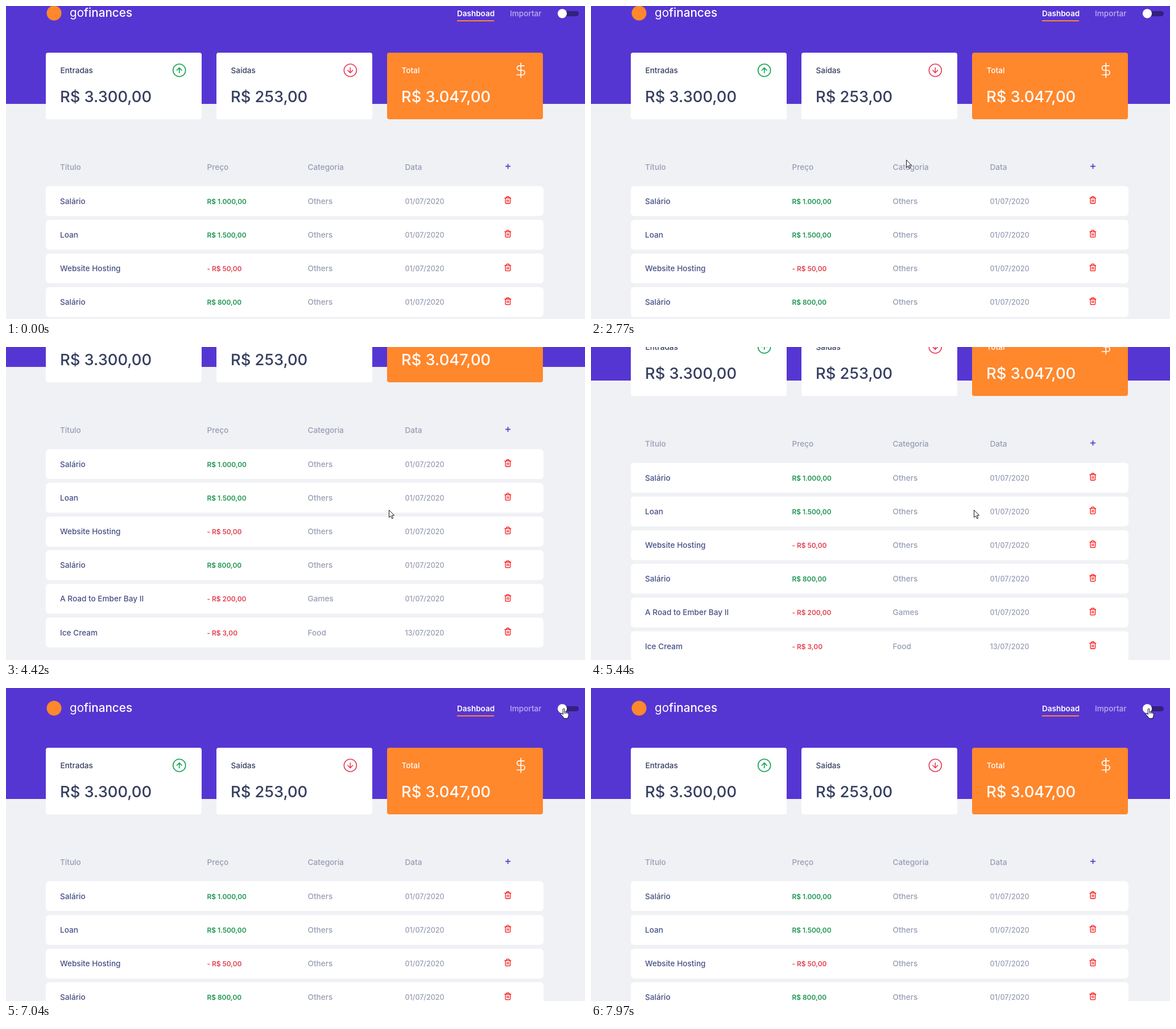
Write an HTML page that moves like this. It is 1018 px wide and 550 px high and loops after 8000 ms.

```html
<!DOCTYPE html>
<html lang="pt">
<head>
<meta charset="utf-8">
<title>gofinances</title>
<style>
html, body { margin: 0; width: 100%; height: 100%; overflow: hidden; }
svg {
  display: block; width: 1018px; height: 550px; background: var(--bg);
  font: 500 13.6px Inter, "Open Sans", sans-serif;
  --bg: #f0f1f5; --head: #5636d3; --card: #fff; --row: #fff; --total: #ff872c;
  --ink: #363f5f; --amount: #363f5f; --name: #465084; --muted: #969cb3;
  --green: #1b9450; --red: #e0404f; --plus: #5636d3; --rail: #32217c;
}
svg.dark {
  --bg: #1e1b2e; --head: #32217c; --card: #1a0f3d; --row: #19103a; --total: #c96c21;
  --ink: #d5d3e2; --amount: #c5c3d4; --name: #5856a0; --muted: #9fa1c6;
  --green: #12a454; --red: #e83f4f; --plus: #4a2fc4; --rail: #7b60dc;
}
.icon { fill: none; stroke-width: 1.5; stroke-linecap: round; stroke-linejoin: round; }
.amount { font-size: 27.3px; }
.price { font-size: 11.9px; font-weight: 600; }
.date { font-size: 12.5px; }
.brand { font-size: 20.7px; }
.active { font-size: 13.5px; font-weight: 600; }
</style>
</head>
<body>
<svg id="stage" viewBox="0 0 1018 550">
  <defs>
    <linearGradient id="sky" gradientUnits="userSpaceOnUse" x1="451" y1="315" x2="567" y2="-120">
      <stop offset=".56" style="stop-color:var(--head)"/>
      <stop offset=".94" stop-color="#5636d3"/>
    </linearGradient>
  </defs>
  <g id="page"></g>
  <circle id="click" cx="674" cy="285" r="9.7" fill="#f6f27c"/>
  <g id="cursor" fill="#fff" stroke="#15151c" stroke-linejoin="round">
    <path id="arrow" d="M.5 .5V13.6L3.5 10.8 5.7 15.6 7.7 14.7 5.5 9.9H9.6Z"/>
    <path id="hand" d="M.2 1Q1.6-1 3 1V6Q5 5 5.6 6.7 7.6 6 8.1 7.5 10 7 10.2 9V12Q10 14.5 8.8 15.8V17.5H1.8V16Q-1 13.5-3.4 10.3-3.8 8-1.8 8.6L.2 10.5Z M3 6V9 M5.6 6.7V9.3 M8.1 7.5V9.6"/>
  </g>
</svg>
<script>
const $ = id => document.getElementById(id);
const text = (x, y, str, color, cls = '', extra = '') =>
  `<text x="${x}" y="${y}" class="${cls}" style="fill:${color}" ${extra}>${str}</text>`;
const box = (x, y, w, h, r, color) =>
  `<rect x="${x}" y="${y}" width="${w}" height="${h}" rx="${r}" style="fill:${color}"/>`;
// Line icons are drawn on a 24 unit grid and centred at x, y.
const icon = (x, y, scale, color, d, width = 1.5) =>
  `<path class="icon" transform="translate(${x} ${y}) scale(${scale}) translate(-12 -12)" style="stroke:${color};stroke-width:${width}" d="${d}"/>`;

const RING = 'M22 12a10 10 0 1 1-20 0a10 10 0 1 1 20 0';
const UP = RING + 'M16 12L12 8L8 12M12 16V8';
const DOWN = RING + 'M8 12L12 16L16 12M12 8V16';
const DOLLAR = 'M12 1V23M17 5H9.5a3.5 3.5 0 0 0 0 7h5a3.5 3.5 0 0 1 0 7H6';
const TRASH = 'M3 6H21M19 6V20a2 2 0 0 1-2 2H7a2 2 0 0 1-2-2V6M8 6V4a2 2 0 0 1 2-2h4a2 2 0 0 1 2 2V6M10 11V17M14 11V17';

const card = (x, label, amount, fill, ink, big, glyph) =>
  box(x, 105, 274, 117, 4, fill) +
  text(x + 25.5, 141, label, ink) + text(x + 25, 192, amount, big, 'amount') + glyph;

const rows = [
  ['Salário', 'R$ 1.000,00', 'Others', '01'],
  ['Loan', 'R$ 1.500,00', 'Others', '01'],
  ['Website Hosting', '- R$ 50,00', 'Others', '01'],
  ['Salário', 'R$ 800,00', 'Others', '01'],
  ['A Road to Ember Bay II', '- R$ 200,00', 'Games', '01'],
  ['Ice Cream', '- R$ 3,00', 'Food', '13']
];
const row = ([name, price, category, day], i) => {
  const y = 339.5 + 59.2 * i, base = y + 31;
  return box(70, y, 875, 52.5, 6, 'var(--row)') +
    text(95, base, name, 'var(--name)') +
    text(353.5, base, price, price[0] === '-' ? 'var(--red)' : 'var(--green)', 'price') +
    text(530.5, base, category, 'var(--muted)') +
    text(701.5, base, day + '/07/2020', 'var(--muted)', 'date') +
    icon(882.3, y + 24.5, .6, '#f80c0c', TRASH, 2.1);
};

$('page').innerHTML =
  box(0, 0, 1018, 195, 0, 'url(#sky)') +
  '<circle cx="84.5" cy="35.5" r="13" fill="#ff872c"/>' +
  text(112, 41.5, '<tspan font-weight="400">go</tspan>finances', '#fff', 'brand') +
  text(793, 41, 'Dashboad', '#fff', 'active') + box(793, 48, 65, 2, 0, '#ff872c') +
  text(886, 41, 'Importar', '#fff', '', 'opacity=".6"') +
  box(974, 32, 33, 9, 4.5, 'var(--rail)') +
  '<circle id="knob" cy="36.3" r="8.1" fill="#fff"/>' +
  card(70, 'Entradas', 'R$ 3.300,00', 'var(--card)', 'var(--ink)', 'var(--amount)',
    icon(304.7, 136, 1.1, '#12a454', UP)) +
  card(370, 'Saídas', 'R$ 253,00', 'var(--card)', 'var(--ink)', 'var(--amount)',
    icon(605.3, 136, 1.1, '#e83f5b', DOWN)) +
  card(670, 'Total', 'R$ 3.047,00', 'var(--total)', '#fff', '#fff',
    icon(905.3, 136, 1.14, '#fff', DOLLAR)) +
  [[95, 'Título'], [353.5, 'Preço'], [530.5, 'Categoria'], [701.5, 'Data']]
    .map(([x, label]) => text(x, 310.5, label, 'var(--muted)')).join('') +
  '<path d="M878 304.7H887M882.5 300.2V309.2" style="stroke:var(--plus)" stroke-width="1.7"/>' +
  rows.map(row).join('');

const scrollKeys = [[0, 23], [4110, 23], [4420, 160], [5350, 160], [5720, 0], [8000, 0]];
const knobKeys = [[0, 978], [7040, 978], [7300, 1002], [7720, 1002], [7960, 978], [8000, 978]];
const cursorKeys = [
  [290, 1018, 150], [700, 700, 330], [1060, 420, 390], [1380, 326, 277], [1530, 326, 277],
  [2070, 554, 270], [2770, 554, 270], [3550, 656, 291], [3630, 674.5, 285], [3870, 674.5, 285],
  [3940, 673, 286], [5650, 673, 286], [5880, 810, 290], [6110, 892, 184], [6600, 950, 26],
  [6950, 979, 36], [8000, 979, 36]
];
const smooth = k => k * k * (3 - 2 * k);
function track(keys, t, ease = k => k) {
  const i = keys.findIndex(key => key[0] > t);
  if (i < 1) return keys[0].slice(1);
  const a = keys[i - 1], b = keys[i], k = ease((t - a[0]) / (b[0] - a[0]));
  return a.slice(1).map((v, n) => v + (b[n + 1] - v) * k);
}
const show = (id, on) => $(id).setAttribute('visibility', on ? 'visible' : 'hidden');

function draw(now) {
  const t = now % 8000;
  const [scroll] = track(scrollKeys, t, smooth);
  const [x, y] = track(cursorKeys, t);
  const overSwitch = t > 6000 && x > 969;
  $('page').setAttribute('transform', `translate(0 ${-Math.round(scroll)})`);
  $('knob').setAttribute('cx', track(knobKeys, t, smooth)[0]);
  $('cursor').setAttribute('transform', `translate(${Math.round(x)} ${Math.round(y)})`);
  $('stage').classList.toggle('dark', t >= 7120 && t < 7740);
  show('click', t >= 3630 && t < 3870);
  show('arrow', t >= 290 && !overSwitch);
  show('hand', overSwitch);
  requestAnimationFrame(() => draw(performance.now()));
}
draw(performance.now());
</script>
</body>
</html>
```
